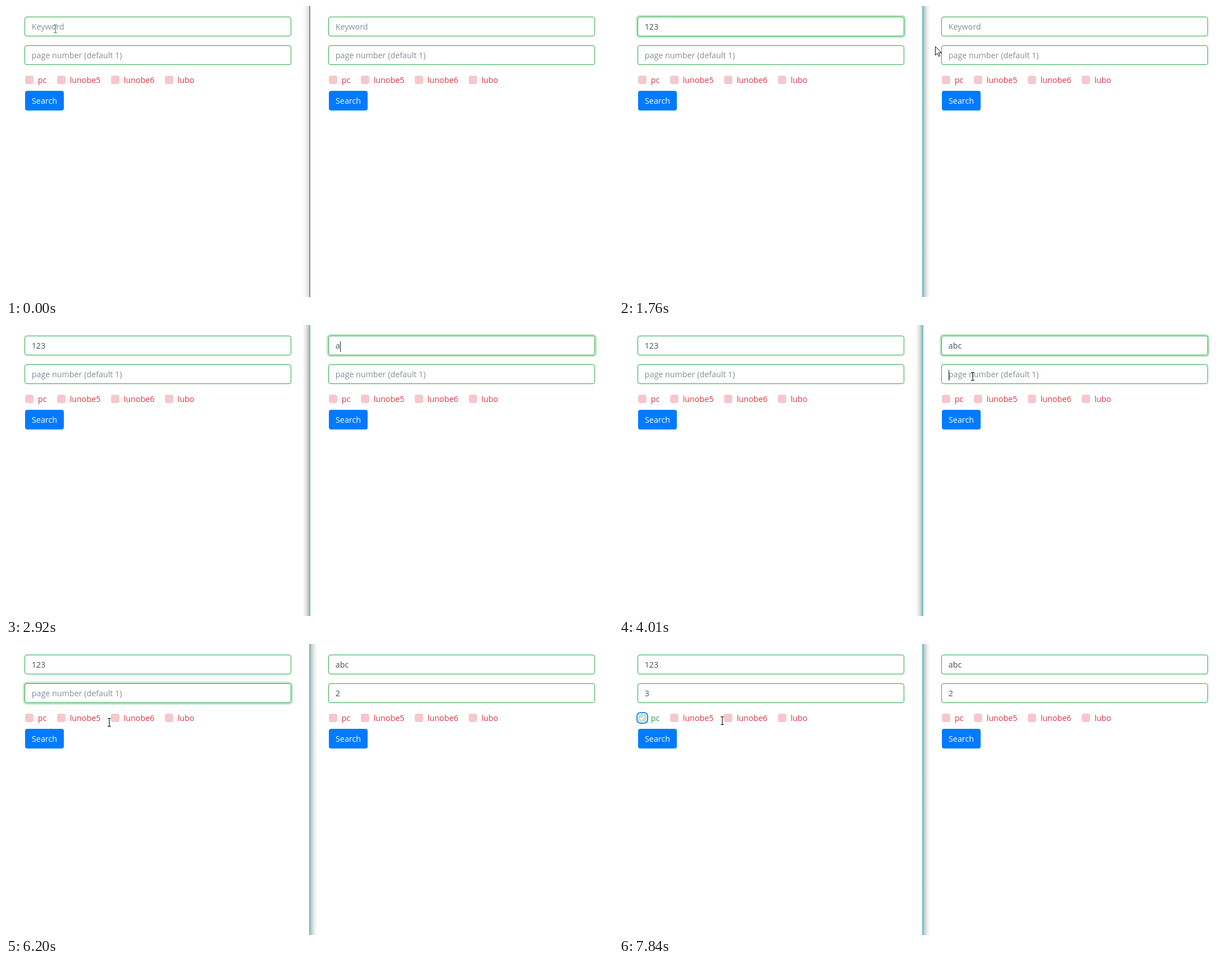
Write an HTML page that moves like this. It is 1081x518 px and loops after 7.99 s.

```html
<!DOCTYPE html>
<html lang="en">
<head>
<meta charset="utf-8">
<title>Two synchronised search forms</title>
<style>
  html, body { margin: 0; width: 100%; height: 100%; overflow: hidden; background: #fff; }
  body { position: relative; font: 14.3px/20px "Open Sans", "Noto Sans", sans-serif; cursor: default; }
  .pane { position: absolute; top: 0; left: 0; }
  .pane + .pane { left: 541px; }
  .pane > * { position: absolute; box-sizing: border-box; white-space: pre; }
  .field { left: 33px; width: 475px; height: 35px; border: 1px solid #28a745; border-radius: 4px;
    padding-left: 11.7px; line-height: 33px; color: #495057; background: #fff; }
  .field i { display: inline-block; width: 1px; height: 19px; margin-right: -1px;
    vertical-align: middle; background: #222; }
  .field span { color: #868e96; }
  .box { top: 124px; width: 15px; height: 15px; border-radius: 4px; background: #f6c8cd; }
  .box svg { display: none; position: absolute; left: 0; top: 0; }
  .label { top: 122px; color: #dc3545; }
  .on { background: #c3e6cb; box-shadow: 0 0 0 1px #fff, 0 0 0 2.8px #007bff; }
  .on svg { display: block; }
  .on + .label { color: #28a745; }
  .button { left: 34px; top: 151px; width: 69px; height: 35px; border-radius: 4px;
    background: #007bff; color: #fff; text-align: center; line-height: 35px; }
  #line, #shade { position: absolute; top: 0; height: 100%; }
  #line { left: 540px; width: 2px; }
  #shade { width: 12px; }
  #pointer { position: absolute; left: 0; top: 0; overflow: visible; }
</style>
</head>
<body>
<div id="shade"></div>
<div id="line"></div>
<svg id="pointer" width="1" height="1">
  <path id="beam" d="M-3-7H3M0-7V7M-3 7H3" fill="none" stroke-width="1.2"/>
  <path id="arrow" d="M.5.5V16L4 12.7 6.5 18 8.8 17 6.4 11.7H11.3Z" fill="#fff" stroke="#000"/>
</svg>
<script>
const LOOP = 7990, FADE = 150, BLINK = 540, KEY_GAP = 75, MOVE = 240;
const $ = id => document.getElementById(id);
const clamp = v => Math.max(0, Math.min(1, v));
const within = (v, a, b) => v >= a && v < b;

const hints = ["Keyword", "page number (default 1)"];
const options = [["pc", 34], ["lunobe5", 91], ["lunobe6", 187], ["lubo", 283]];
const pane = `<div class="pane">
  <div class="field" style="top:19px"></div>
  <div class="field" style="top:70px"></div>
  ${options.map(([name, x]) => `<div class="box" style="left:${x}px"><svg width="15" height="15">
    <path d="M4 7.5 6.5 10 11 5" fill="none" stroke="#fff" stroke-width="2"/></svg></div>
  <div class="label" style="left:${x + 22.7}px">${name}</div>`).join("")}
  <div class="button">Search</div></div>`;
$("shade").insertAdjacentHTML("beforebegin", pane + pane);

const fields = [...document.querySelectorAll(".field")];
const pcBox = document.querySelector(".box");

// Clicks: what takes the focus, and when
const clicks = [
  { at: 365, on: 0 }, { at: 2490, on: 2 }, { at: 4010, on: 3 },
  { at: 5260, on: 1 }, { at: 6900, on: "pc" }
];
// Bursts of typing
const bursts = [
  { at: 990, on: 0, text: "123" }, { at: 2920, on: 2, text: "a" }, { at: 3320, on: 2, text: "bc" },
  { at: 4720, on: 3, text: "2" }, { at: 6380, on: 1, text: "3" }
];
// Pointer stops: arrival time, x, y
const stops = [[0, 88, 40], [1680, 558, 72], [1990, 665, 53], [2450, 645, 46], [3930, 630, 91],
  [5030, 302, 87], [5810, 286, 88], [6200, 184, 139], [6830, 46, 128],
  [7210, 246, 130], [7440, 206, 130], [7690, 157, 127], [7840, 184, 136]];

// Each move fills the last moments before its arrival
const moves = stops.slice(1).map(([end, x, y], i) => {
  const [free, fromX, fromY] = stops[i];
  return { start: Math.max(free, end - MOVE), end, fromX, fromY, x, y };
});

function drawFields(t) {
  fields.forEach((el, n) => {
    const i = clicks.findIndex(c => c.on === n);
    const from = clicks[i].at, until = clicks[i + 1].at;
    let text = "", last = from;
    for (const b of bursts.filter(b => b.on === n && b.at <= t)) {
      const count = Math.min(b.text.length, 1 + Math.floor((t - b.at) / KEY_GAP));
      text += b.text.slice(0, count);
      last = b.at + (count - 1) * KEY_GAP;
    }
    const caret = within(t, from, until) && Math.floor((t - last) / BLINK) % 2 === 0;
    const glow = clamp((t - from) / FADE) - clamp((t - until) / FADE);
    const html = text + (caret ? "<i></i>" : "") + (text ? "" : `<span>${hints[n % 2]}</span>`);
    if (el.shown !== html) el.innerHTML = el.shown = html;
    el.style.boxShadow = `0 0 0 ${3 * glow}px rgba(60,190,80,${0.32 * glow})`;
  });
  pcBox.classList.toggle("on", t >= clicks[4].at);
}

// The active window casts its shadow onto its neighbour
function drawDivider(t) {
  const idle = t < clicks[0].at;
  const leftActive = !idle && !within(t, clicks[1].at, clicks[3].at);
  const dark = idle ? .15 : .27;
  $("line").style.background = idle ? "#8a8a8a" : "#5cc3c8";
  $("shade").style.left = leftActive ? "542px" : "528px";
  $("shade").style.background = `linear-gradient(to ${leftActive ? "right" : "left"},
    rgba(0,0,0,${dark}), rgba(0,0,0,${dark * .35}) 50%, transparent)`;
}

function drawPointer(t) {
  const move = moves.findLast(m => m.start <= t) || moves[0];
  const f = clamp((t - move.start) / (move.end - move.start));
  const x = move.fromX + (move.x - move.fromX) * f;
  const y = move.fromY + (move.y - move.fromY) * f;
  const inField = (within(x, 33, 508) || within(x, 574, 1049)) && (within(y, 19, 54) || within(y, 70, 105));
  const inGap = within(x, 168, 187) && within(y, 120, 145);
  const isBeam = inField || inGap;
  // Typing hides the pointer until it moves again
  const hidden = bursts.some(b => b.at <= t && !moves.some(m => within(m.start, b.at, t)));
  $("pointer").style.transform = `translate(${x}px,${y + .5}px)`;
  $("pointer").style.display = hidden ? "none" : "block";
  $("beam").style.display = isBeam ? "" : "none";
  $("arrow").style.display = isBeam ? "none" : "";
  $("beam").style.stroke = t < clicks[0].at ? "#2a9d50" : "#111";
}

function frame(now) {
  const t = now % LOOP;
  drawFields(t);
  drawDivider(t);
  drawPointer(t);
  requestAnimationFrame(frame);
}
frame(0);
</script>
</body>
</html>
```
